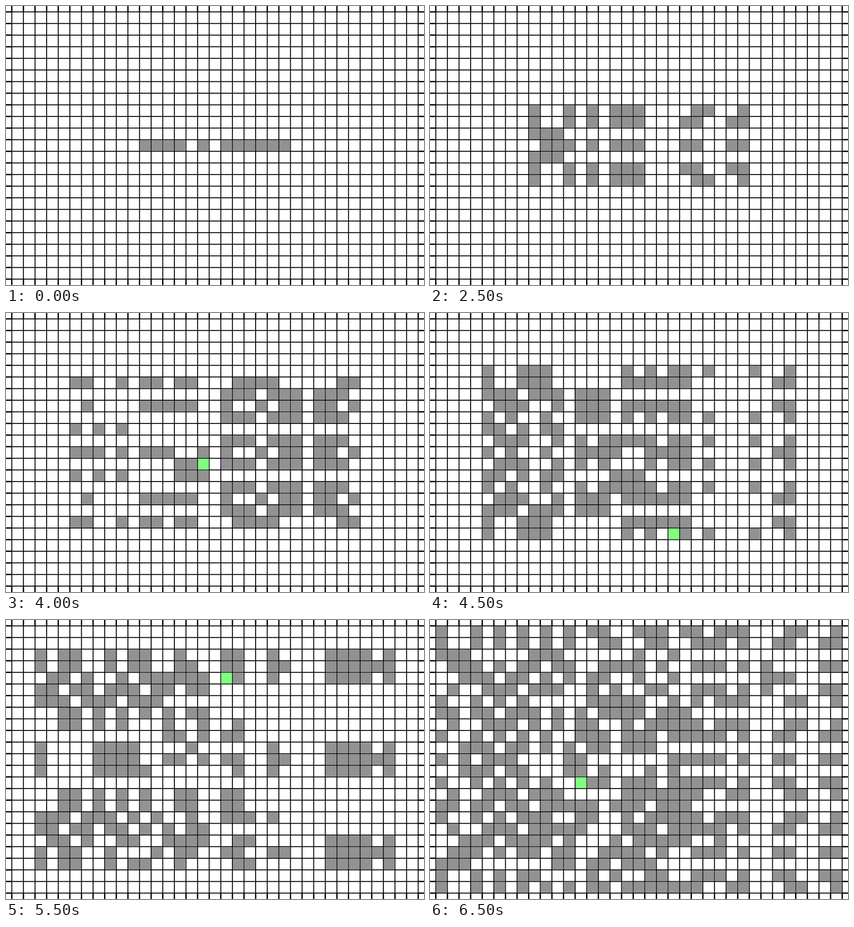
An HTML page with a canvas for the animation above (8 s loop, 916x611 px).

```html
<!DOCTYPE html>
<html lang="en">
<head>
<meta charset="utf-8">
<title>Parity automaton</title>
<style>
  html, body { margin: 0; width: 100%; height: 100%; overflow: hidden; background: #fff; }
  canvas { display: block; }
</style>
</head>
<body>
<canvas id="stage" width="916" height="611"></canvas>
<script>
const W = 916, H = 611, COLS = 35, ROWS = 23, PITCH = W / 36;
const X0 = (W - COLS * PITCH) / 2, Y0 = (H - ROWS * PITCH) / 2;
const LOOP = 8000, HOLD = 1500, STEP = 500, LAST = 11;
const GREY = '#929292', BORN = '#ff8080', KILLED = '#80ff80';

const SEED = '1111010111111';
// One cell [column, row] is flipped after these generations.
const FLIPS = {
  1: [23, 11], 2: [9, 11], 4: [7, 11], 5: [15, 12], 6: [16, 12], 7: [20, 18],
  8: [11, 18], 9: [18, 4], 10: [29, 4], 11: [12, 13]
};

const ctx = document.getElementById('stage').getContext('2d');

const makeGrid = fn =>
  Array.from({ length: ROWS }, (_, r) => Array.from({ length: COLS }, (_, c) => fn(c, r)));

// A cell lives when its 3x3 block holds an odd number of live cells.
function evolve(grid) {
  return makeGrid((c, r) => {
    let sum = 0;
    for (let y = r - 1; y <= r + 1; y++)
      for (let x = c - 1; x <= c + 1; x++) sum ^= grid[y]?.[x] ?? 0;
    return sum;
  });
}

function buildGenerations() {
  const left = (COLS - SEED.length) / 2;
  const list = [makeGrid((c, r) => (r === 11 && SEED[c - left] === '1' ? 1 : 0))];
  for (let g = 1; g <= LAST; g++) {
    const next = evolve(list[g - 1]);
    if (FLIPS[g]) {
      const [c, r] = FLIPS[g];
      next[r][c] ^= 1;
    }
    list.push(next);
  }
  return list;
}

function drawLines() {
  const right = X0 + COLS * PITCH, bottom = Y0 + ROWS * PITCH;
  const thin = 2, thick = 2.8;
  ctx.fillStyle = '#000';
  for (let i = 0; i <= COLS; i++) {
    const x = X0 + i * PITCH;
    ctx.fillRect(x - thin / 2, 0, thin, H);
    ctx.fillRect(x - thick / 2, 0, thick, Y0);
    ctx.fillRect(x - thick / 2, bottom, thick, H - bottom);
  }
  for (let i = 0; i <= ROWS; i++) {
    const y = Y0 + i * PITCH;
    ctx.fillRect(0, y - thin / 2, W, thin);
    ctx.fillRect(0, y - thick / 2, X0, thick);
    ctx.fillRect(right, y - thick / 2, W - right, thick);
  }
}

function fillCell(c, r, color) {
  const inset = 0.8, size = PITCH - 2 * inset;
  ctx.fillStyle = color;
  ctx.fillRect(X0 + c * PITCH + inset, Y0 + r * PITCH + inset, size, size);
}

const generations = buildGenerations();

function draw(g) {
  const grid = generations[g];
  ctx.fillStyle = '#fff';
  ctx.fillRect(0, 0, W, H);
  drawLines();
  grid.forEach((row, r) => row.forEach((on, c) => { if (on) fillCell(c, r, GREY); }));
  if (FLIPS[g]) {
    const [c, r] = FLIPS[g];
    fillCell(c, r, grid[r][c] ? BORN : KILLED);
  }
}

const start = performance.now();
let shown = -1;

function tick() {
  const t = (performance.now() - start) % LOOP;
  const g = t < HOLD ? 0 : Math.min(LAST, 1 + Math.floor((t - HOLD) / STEP));
  if (g !== shown) draw(shown = g);
  requestAnimationFrame(tick);
}
tick();
</script>
</body>
</html>
```
